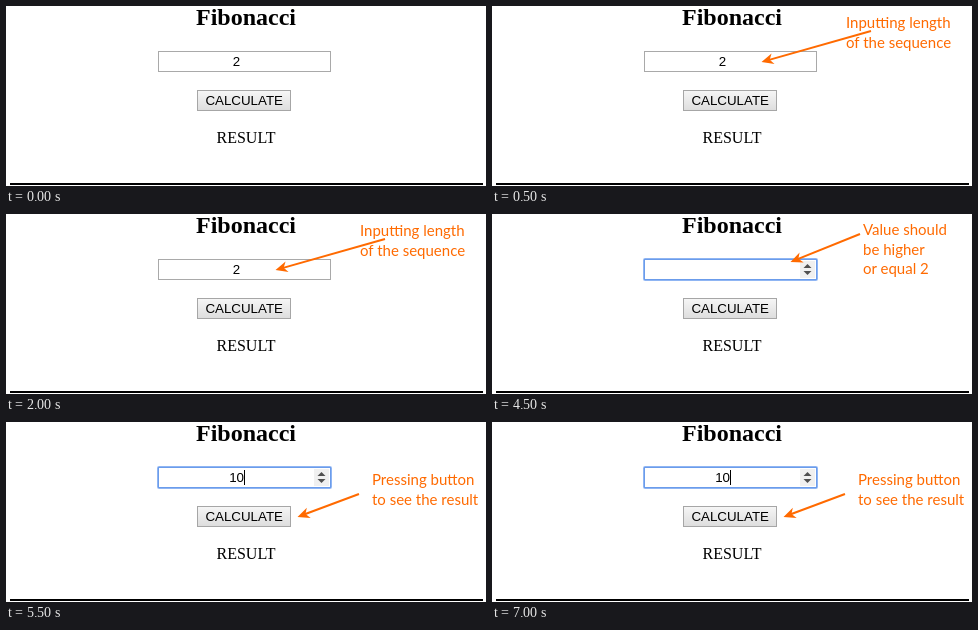
Write an HTML page that moves like this. It is 480 px wide and 180 px high and loops after 8000 ms.

```html
<!DOCTYPE html>
<html lang="en">
<head>
<meta charset="utf-8">
<title>Fibonacci</title>
<style>
html, body { margin: 0; width: 100%; height: 100%; overflow: hidden; background: #fff; }
svg { display: block; width: 480px; height: 180px; }
.serif { font: 16px "Liberation Serif", serif; }
.title { font-size: 24px; font-weight: bold; }
.ui { font: 13.333px "Liberation Sans", sans-serif; }
.mid { text-anchor: middle; }
.note { font: 15px Lato, sans-serif; fill: #ff6a00; }
.note line { stroke: #ff6a00; stroke-width: 2; }
.step { opacity: 0; }
</style>
</head>
<body>
<svg viewBox="0 0 480 180">
  <defs>
    <linearGradient id="face" x2="0" y2="1">
      <stop offset="0" stop-color="#f6f6f6"/>
      <stop offset="1" stop-color="#dddddd"/>
    </linearGradient>
  </defs>

  <text class="serif title mid" x="240" y="19">Fibonacci</text>
  <rect x="152.5" y="45.5" width="172" height="20" fill="#fff" stroke="#a9a9a9"/>
  <rect x="191.5" y="84.5" width="93" height="20" fill="url(#face)" stroke="#a6a6a6"/>
  <text class="ui mid" x="238.2" y="99">CALCULATE</text>
  <text class="serif mid" x="240" y="137">RESULT</text>
  <rect x="4" y="177" width="473" height="2"/>

  <text class="ui mid step" data-from="0" data-to="3000" x="230.5" y="60">2</text>

  <g class="step" data-from="3000" data-to="8000">
    <rect x="151.5" y="44.5" width="174" height="22" rx="1" fill="none" stroke="#8fb5f3"/>
    <rect x="152.5" y="45.5" width="172" height="20" fill="#fff" stroke="#6b9ceb"/>
    <rect x="308" y="47" width="15" height="17" fill="#f0f0f0"/>
    <path d="M311.5 54l4-4 4 4zM311.5 57l4 4 4-4z" fill="#505050"/>
  </g>

  <g class="step" data-from="5500" data-to="8000">
    <text class="ui mid" x="230.6" y="60">10</text>
    <rect x="238" y="48" width="1" height="15"/>
  </g>

  <g id="notes"></g>
</svg>
<script>
const LOOP = 8000;
const NS = "http://www.w3.org/2000/svg";

const notes = [
  { from: 500, to: 3000, x: 354, y: 22, lead: 20, arrow: [379, 25, 269.5, 56],
    lines: ["Inputting length", "of the sequence"] },
  { from: 3000, to: 5500, x: 371, y: 21, lead: 19.5, arrow: [368, 20, 298.5, 48],
    lines: ["Value should", "be higher", "or equal 2"] },
  { from: 5500, to: 8000, x: 366, y: 63, lead: 20, arrow: [353, 72, 291.5, 95],
    lines: ["Pressing button", "to see the result"] }
];

function add(parent, tag, attrs, text = "") {
  const el = document.createElementNS(NS, tag);
  for (const key in attrs) el.setAttribute(key, attrs[key]);
  el.textContent = text;
  return parent.appendChild(el);
}

function drawArrow(parent, [x1, y1, x2, y2]) {
  const angle = Math.atan2(y2 - y1, x2 - x1);
  const length = Math.hypot(x2 - x1, y2 - y1);
  const g = add(parent, "g", {
    transform: `translate(${x2} ${y2}) rotate(${angle * 180 / Math.PI})`
  });
  add(g, "line", { x1: -length, x2: -7, y1: 0, y2: 0 });
  add(g, "path", { d: "M0 0L-12 -5.5L-8.5 0L-12 5.5Z" });
}

for (const n of notes) {
  const g = add(document.getElementById("notes"), "g", {
    class: "note step", "data-from": n.from, "data-to": n.to
  });
  drawArrow(g, n.arrow);
  n.lines.forEach((line, i) => add(g, "text", { x: n.x, y: n.y + i * n.lead }, line));
}

// Each part is fully shown between its two times and hidden otherwise.
for (const el of document.querySelectorAll(".step")) {
  const from = +el.dataset.from, to = +el.dataset.to;
  const frames = [0, from, to, LOOP].map(t => ({
    offset: t / LOOP,
    opacity: t >= from && t < to ? 1 : 0,
    easing: "steps(1, end)"
  }));
  el.animate(frames, { duration: LOOP, iterations: Infinity });
}
</script>
</body>
</html>
```
